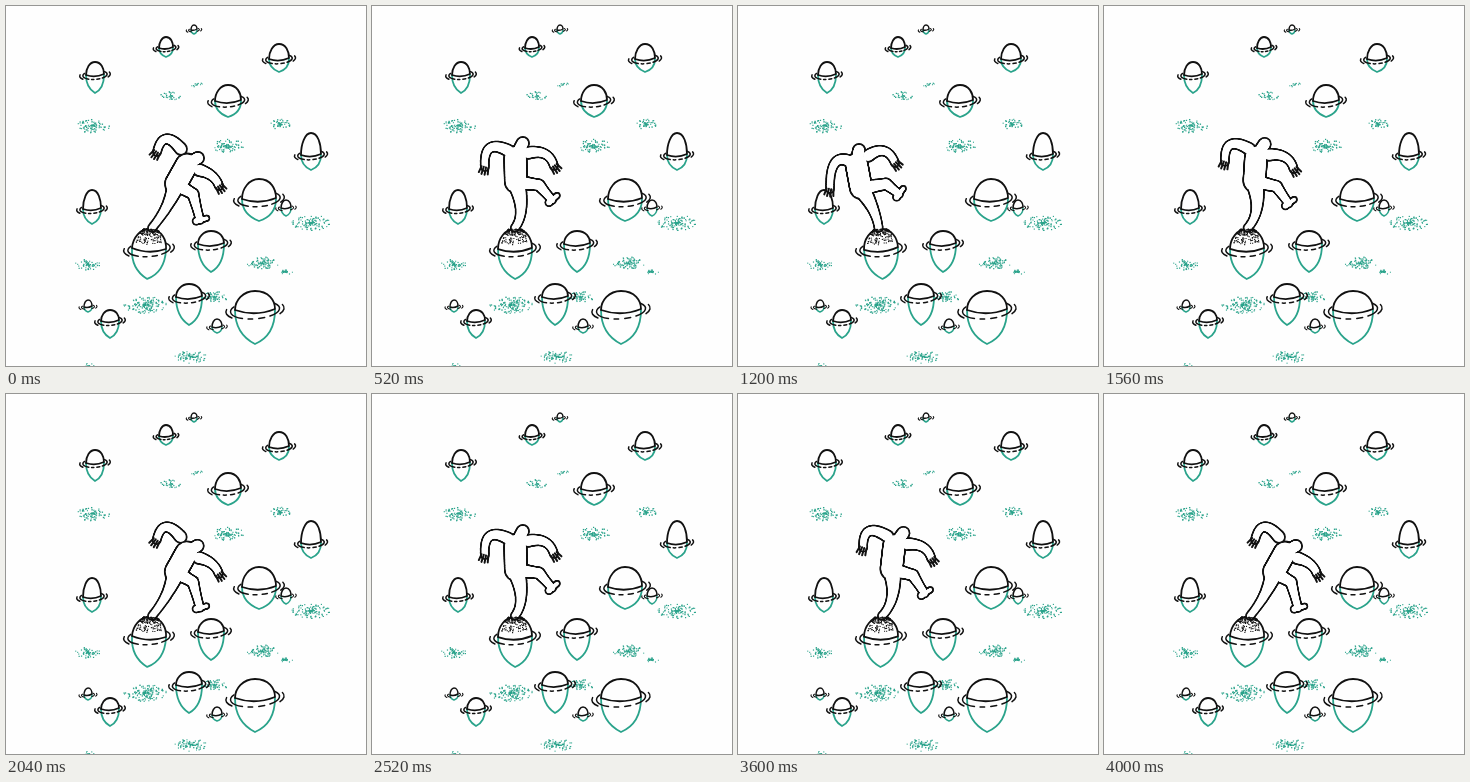
Animation, 360 px wide and 360 px high, one loop 4.04 s. Source, as an HTML page with a canvas:

```html
<!DOCTYPE html>
<html lang="en">
<head>
<meta charset="utf-8">
<title>Balancing on a rock</title>
<style>
html, body { margin: 0; width: 100%; height: 100%; overflow: hidden; background: #fefefe; }
canvas { display: block; width: 360px; height: 360px; }
</style>
</head>
<body>
<canvas id="stage" width="360" height="360"></canvas>
<script>
const INK = '#111', GREEN = '#2aa38b', PAPER = '#fefefe';
const LOOP = 4040, STEP = 40, SWAY = 2000, LINE = 1.8;
const ctx = document.getElementById('stage').getContext('2d');

// x, waterline, half width, height above, depth below
const rocks = [
  [89, 69, 9, 13, 18], [160, 42, 7, 11, 9], [188, 24, 3, 5, 4],
  [273, 53, 10, 15, 13], [222, 95, 13, 16, 16], [305, 149, 10, 22, 15],
  [253, 193, 17, 20, 22], [280, 202, 5, 8, 8], [86, 203, 9, 19, 15],
  [205, 238, 13, 13, 28], [183, 291, 13, 13, 28], [249, 304, 20, 19, 34],
  [82, 301, 4, 7, 5], [104, 315, 9, 11, 17], [211, 321, 5, 8, 6]
];
const perch = [143, 243, 17, 20, 30];

// x, y, width
const patches = [
  [87, 120, 34], [165, 90, 21], [191, 79, 13], [222, 140, 34], [274, 118, 25],
  [305, 217, 39], [82, 259, 27], [257, 257, 32], [280, 266, 17], [139, 299, 43],
  [208, 291, 28], [185, 351, 32], [82, 360, 14]
];

// Each joint when leaning right, standing and leaning left
const LEANS = [1, -0.06, -0.81];
const joints = {
  head: [[192, 152], [151, 137], [121, 144]],
  hip: [[170, 178], [144, 176], [123, 182]],
  standKnee: [[161, 200], [149, 203], [135, 203]],
  knee: [[187, 188], [167, 179], [148, 178]],
  ankle: [[194, 214], [180, 194], [161, 188]],
  leftShoulder: [[175, 143], [137, 145], [113, 156]],
  leftElbow: [[160, 133], [118, 142], [97, 157]],
  leftWrist: [[151, 146], [113, 161], [92, 183]],
  rightShoulder: [[193, 164], [156, 147], [130, 150]],
  rightElbow: [[206, 170], [173, 148], [146, 145]],
  rightWrist: [[213, 180], [182, 160], [157, 157]]
};

function randomizer(seed) {
  return () => (seed = (seed * 16807) % 2147483647) / 2147483647;
}

function pen(color, width) {
  ctx.strokeStyle = color;
  ctx.lineWidth = width;
  ctx.lineCap = ctx.lineJoin = 'round';
}

function dot(x, y, size, color) {
  ctx.fillStyle = color;
  ctx.fillRect(x - size / 2, y - size / 2, size, size);
}

function disc([x, y], r) {
  ctx.beginPath();
  ctx.arc(x, y, r, 0, Math.PI * 2);
  ctx.fill();
}

function drawPatches() {
  const rnd = randomizer(4711);
  for (const [x, y, w] of patches) {
    for (let i = w * w / 13; i > 0; i--) {
      const a = rnd() * Math.PI * 2, r = rnd() * w / 2;
      dot(x + Math.cos(a) * r, y + Math.sin(a) * r * 0.4, 1 + rnd() * 0.4, GREEN);
    }
  }
}

function drawRock([x, y, r, rise, depth]) {
  const line = r < 6 ? 1.5 : LINE;
  pen(GREEN, line);
  ctx.beginPath();
  ctx.moveTo(x - r, y);
  ctx.bezierCurveTo(x - r, y + depth * 0.55, x - r * 0.5, y + depth * 0.85, x, y + depth);
  ctx.bezierCurveTo(x + r * 0.6, y + depth * 0.85, x + r, y + depth * 0.55, x + r, y);
  ctx.stroke();

  pen(INK, line);
  ctx.fillStyle = PAPER;
  ctx.beginPath();
  ctx.moveTo(x - r, y);
  ctx.bezierCurveTo(x - r, y - rise * 0.5, x - r * 0.6, y - rise, x, y - rise);
  ctx.bezierCurveTo(x + r * 0.7, y - rise, x + r, y - rise * 0.5, x + r, y - 1);
  ctx.quadraticCurveTo(x, y + r * 0.35, x - r, y);
  ctx.fill();
  ctx.stroke();
}

// Broken rings around the waterline
function drawRipples([x, y, r]) {
  const arc = (rx, from, to) => {
    ctx.beginPath();
    ctx.ellipse(x, y, rx, rx * 0.36, -0.08, from * Math.PI, to * Math.PI);
    ctx.stroke();
  };
  pen(INK, r < 6 ? 1.1 : 1.5);
  const gap = 2 + r * 0.13;
  arc(r + gap, 0.68, 1.18);
  arc(r + gap, -0.2, 0.3);
  arc(r + gap * 2, 0.8, 1.08);
  arc(r + gap * 2, -0.1, 0.18);
  if (r > 6) {
    arc(r + gap, 0.38, 0.46);
    arc(r + gap, 0.54, 0.6);
  }
}

function tilted(lean, paint) {
  const [x, y] = perch;
  ctx.save();
  ctx.translate(x, y);
  ctx.rotate(lean * 0.06);
  ctx.translate(-x, -y);
  paint();
  ctx.restore();
}

function drawStipple() {
  const [x, y, , rise] = perch, rnd = randomizer(97);
  for (let i = 0; i < 190; i++) {
    const depth = Math.pow(rnd(), 2.2);
    const half = 7 + 7 * Math.sqrt(depth);
    dot(x + (rnd() * 2 - 1) * half, y - rise + depth * 15 + rnd(), 1.1, INK);
  }
}

// Quadratic through the three keys of a joint
function blend(keys, lean) {
  const weights = LEANS.map((own, i) => LEANS.reduce(
    (w, other, j) => i === j ? w : w * (lean - other) / (own - other), 1));
  return [0, 1].map(k => keys.reduce((sum, key, i) => sum + key[k] * weights[i], 0));
}

const mix = (a, b, t) => [a[0] + (b[0] - a[0]) * t, a[1] + (b[1] - a[1]) * t];
const move = (p, angle, d) => [p[0] + Math.cos(angle) * d, p[1] + Math.sin(angle) * d];
const heading = (a, b) => Math.atan2(b[1] - a[1], b[0] - a[0]);

// Discs along a straight bone or along a curve through a middle joint
function bone(a, b, r0, r1, through = mix(a, b, 0.5)) {
  const control = mix(mix(a, b, 0.5), through, 2);
  return Array.from({ length: 41 }, (_, i) => {
    const t = i / 40;
    const p = mix(mix(a, control, t), mix(control, b, t), t);
    return [p, r1 + (r0 - r1) * (1 - t) ** 2];
  });
}

function drawHand(elbow, wrist) {
  const dir = heading(elbow, wrist);
  pen(INK, 2);
  for (let i = -1.5; i < 2; i++) {
    const from = move(wrist, dir + Math.PI / 2, i * 2.3);
    ctx.beginPath();
    ctx.moveTo(...from);
    ctx.lineTo(...move(from, dir + i * 0.12, 8 - Math.abs(i)));
    ctx.stroke();
  }
}

function drawFigure(lean) {
  const j = {};
  for (const name in joints) j[name] = blend(joints[name], lean);
  const [nx, ny] = mix(j.leftShoulder, j.rightShoulder, 0.5);
  const chest = [nx - 3, ny + 5];
  const foot = [143 + lean * 3, 222];
  const toes = heading(j.knee, j.ankle) - Math.PI / 2;

  const body = [
    bone(chest, j.hip, 11, 11),
    bone(chest, j.head, 6, 6),
    bone(j.hip, foot, 9, 4, j.standKnee),
    bone(j.hip, j.knee, 8, 5.5),
    bone(j.knee, j.ankle, 5.5, 4),
    bone(move(j.ankle, toes, -4), move(j.ankle, toes, 7), 3.5, 2.5),
    bone(j.leftShoulder, j.leftWrist, 6, 4, j.leftElbow),
    bone(j.rightShoulder, j.rightWrist, 6, 4, j.rightElbow)
  ].flat();
  for (const [color, edge] of [[INK, LINE / 2], [PAPER, -LINE / 2]]) {
    ctx.fillStyle = color;
    for (const [p, r] of body) disc(p, r + edge);
  }
  drawHand(j.leftElbow, j.leftWrist);
  drawHand(j.rightElbow, j.rightWrist);
}

function draw(time) {
  const lean = Math.cos(time / SWAY * Math.PI * 2);
  ctx.fillStyle = PAPER;
  ctx.fillRect(0, 0, 360, 360);
  drawPatches();
  rocks.forEach(drawRock);
  rocks.forEach(drawRipples);
  tilted(lean, () => drawRock(perch));
  drawRipples(perch);
  drawFigure(lean);
  tilted(lean, drawStipple);
}

const start = performance.now();
function tick() {
  const time = (performance.now() - start) % LOOP;
  draw(Math.floor(time / STEP) * STEP);
  requestAnimationFrame(tick);
}
tick();
</script>
</body>
</html>
```
